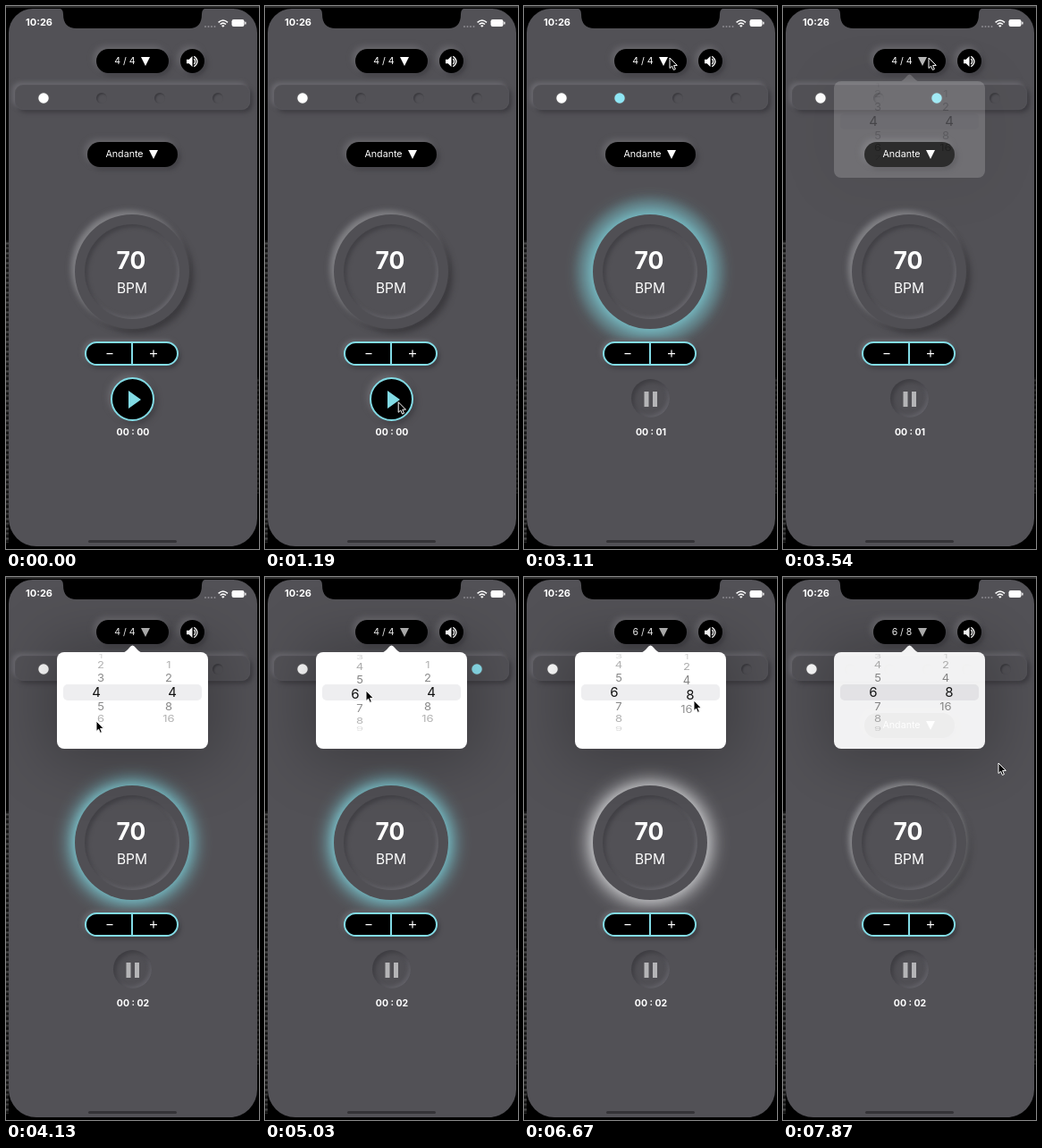
Animation, 283 px wide and 607 px high, one loop 8000 ms. Source, as an HTML page:

```html
<!DOCTYPE html>
<html lang="en">
<head>
<meta charset="utf-8">
<title>Metronome</title>
<style>
  html, body { margin: 0; width: 100%; height: 100%; overflow: hidden; background: #000; }
  #stage { position: relative; width: 283px; height: 607px; overflow: hidden; color: #fff;
    font-family: Inter, sans-serif; --gray: #525156; --cyan: #82dbe5; }
  #stage div, #stage span, #stage svg { position: absolute; box-sizing: border-box; }
  #stage span { transform: translate(-50%, -50%); white-space: pre; line-height: 1.21; }
  .frame { background: linear-gradient(#303030 2px, #000 2px); }
  .noise { background: repeating-linear-gradient(#111 0 2px, #555 3px, #222 5px, #080808 7px, #444 8px, #111 11px); }
  .screen { background: var(--gray); border-radius: 27px 27px 31px 31px; }
  .home { background: #343337; border-radius: 2px; }
  .pill { background: #000; border-radius: 14px;
    box-shadow: -3px -3px 6px #68676c, 3px 3px 5px #424146; }
  .bar { background: var(--gray); border-radius: 9px;
    box-shadow: -3px -3px 5px #69686e, 3px 3px 5px #3d3c41, inset 0 0 2px #5d5c62; }
  .dot { border-radius: 50%; }
  .dial { background: #504f54; border-radius: 50%; }
  .inner { background: var(--gray); border-radius: 50%;
    box-shadow: inset 3px 3px 4px #424146, inset -2px -2px 4px #68676d; }
  .stepper { background: #000; border: 2px solid var(--cyan); border-radius: 14px;
    box-shadow: -2px -2px 5px #68676c, 2px 3px 4px #3c3b40; }
  .divider { background: var(--cyan); }
  .play { background: #000; border: 2px solid var(--cyan); border-radius: 50%;
    box-shadow: -3px -3px 6px #68676c, 3px 3px 6px #403f44; }
  .pause { background: #504f54; border-radius: 50%;
    box-shadow: inset 3px 3px 5px #3e3d42, inset -2px -2px 4px #64636a; }
  .popover { background: #fff; border-radius: 8px; box-shadow: 0 2px 65px 12px rgba(0,0,0,.25); }
  .band { background: #eeeef0; border-radius: 5px; }
  .wheel { overflow: hidden; }
  .wheel span { color: #111; }
</style>
</head>
<body>
<div id="stage"></div>
<script>
const stage = document.getElementById('stage');
const LOOP = 8000, BEAT = 60000 / 70, START = 1750, SIX_FOUR = 6000, SIX_EIGHT = 7600;

function box(cls, x, y, w, h, parent = stage) {
  const el = document.createElement('div');
  el.className = cls;
  el.style.cssText = `left:${x}px;top:${y}px;width:${w}px;height:${h}px`;
  return parent.appendChild(el);
}

function label(text, x, y, size, weight = 400, parent = stage) {
  const el = document.createElement('span');
  el.textContent = text;
  el.style.cssText = `left:${x}px;top:${y}px;font-size:${size}px;font-weight:${weight}`;
  return parent.appendChild(el);
}

// Vector layer in stage coordinates
function art(content, parent = stage) {
  parent.insertAdjacentHTML('beforeend',
    `<svg width="283" height="607" style="left:0;top:0" fill="#fff">${content}</svg>`);
  return parent.lastElementChild;
}

const arrowDown = (x, y) => art(`<path d="M${x - 5} ${y - 5}h10l-5 10z"/>`);

// Phone and status bar
box('frame', 0, 0, 283, 607);
box('noise', 0, 262, 3, 338);
box('noise', 281, 415, 2, 130).style.opacity = .5;
box('screen', 3, 3, 278, 601);
art(`<path fill="#000" d="M57 2q7 0 7 7q0 16 15 16h126q14 0 14-16q0-7 7-7z"/>
  <g fill="#8b8a8f"><circle cx="223" cy="23" r="1"/><circle cx="226.5" cy="23" r="1"/>
  <circle cx="230" cy="23" r="1"/><circle cx="233.5" cy="23" r="1"/></g>
  <g fill="none" stroke="#fff" stroke-width="1.6"><path d="M237.6 18.3q5.2-4.6 10.4 0M239.6 20.5q3.2-2.7 6.4 0"/></g>
  <path d="M241 21.9q1.8-1.4 3.6 0l-1.8 1.9z"/>
  <rect x="252.5" y="15" width="14" height="8" rx="2.2"/><rect x="267.2" y="17.5" width="1.3" height="3" rx=".6"/>`);
label('10:26', 37, 19, 11, 700);
box('home', 92, 597, 99, 3);

// Header controls
box('pill', 101, 48, 81, 27);
const signature = label('4 / 4', 133, 62, 10.5);
const signatureArrow = arrowDown(156, 62);
box('pill', 195, 48, 27, 27);
art(`<path d="M202 59.7h2.7l3.8-3.7v12l-3.8-3.7H202z"/>
  <path fill="none" stroke="#fff" stroke-width="1.3" d="M210.3 59q2.7 3 0 6M210.3 56.3q7.4 5.7 0 11.4"/>`);

box('bar', 10, 88, 263, 28);
const dots = Array.from({ length: 6 }, () => box('dot', 0, 96.5, 12, 12));

box('pill', 91, 152, 101, 28);
label('Andante', 132.5, 166, 10.7);
arrowDown(165, 166);

// Dial
const dial = box('dial', 77, 233, 128, 128);
box('inner', 88, 244, 106, 106);
label('70', 140, 284, 26.5, 700);
label('BPM', 141, 315.5, 15.5);

// Tempo stepper, play button and timer
box('stepper', 88, 375, 105, 27);
box('divider', 140, 375, 2, 27);
art('<path d="M112.5 388h7v1.2h-7zM161 388h8v1.2h-8zM164.4 384.6h1.2v8h-1.2z"/>');
const play = box('play', 117, 415, 49, 49);
const playIcon = art('<path fill="#82dbe5" d="M137 430v20l14-10z"/>');
const pause = box('pause', 120, 417, 43, 43);
const pauseIcon = art('<path fill="#b5b5b7" d="M134.5 431h5v17h-5zM144 431h5v17h-5z"/>');
const timer = label('', 142, 477, 10.5, 700);

// Signature popover
const popover = box('', 0, 0, 283, 607);
box('popover', 57, 84, 169, 108, popover);
art('<path d="M130 85q4-1 8-6q3.500-5 7 0q4 5 8 6z"/>', popover);
box('band', 64, 120, 155, 18, popover);
const wheelArea = box('wheel', 57, 85, 169, 94, popover);
const makeWheel = (values, x, shift) => ({
  x, shift, rows: values.map(v => label(v, 0, 0, 13, 400, wheelArea))
});
const beatsWheel = makeWheel([1, 2, 3, 4, 5, 6, 7, 8, 9, 10], 106, -5);
const unitWheel = makeWheel([1, 2, 4, 8, 16], 182, 4);

const cursor = art(`<path fill="#000" stroke="#fff" stroke-width="1" stroke-linejoin="round"
  d="M0 0v11.500l2.600-2.300 1.800 4.200 2-.9-1.800-4.100h3.700z"/>`);
cursor.style.overflow = 'visible';

// Eased interpolation through [time, value, ...] points
function track(points, t) {
  const i = points.findIndex(p => p[0] > t);
  if (i === 0) return points[0].slice(1);
  if (i < 0) return points[points.length - 1].slice(1);
  const a = points[i - 1], b = points[i];
  const u = (t - a[0]) / (b[0] - a[0]), e = u * u * (3 - 2 * u);
  return a.slice(1).map((v, k) => v + (b[k + 1] - v) * e);
}

const cursorPath = [
  [600, 288, 475], [1250, 146, 442], [1700, 146, 442], [2070, 165, 59], [3110, 163, 58],
  [3600, 163, 58], [4130, 101, 161], [4280, 101, 161], [4900, 113, 127], [5300, 113, 127],
  [6000, 187, 155], [6200, 187, 155], [6670, 190, 138], [7000, 190, 138], [7550, 241, 208]
];
const beatsScroll = [[4250, 3], [5010, 4.88], [5300, 5]];
const unitScroll = [[6200, 2], [6670, 2.83], [6950, 3]];
const popoverFade = [[3500, 0], [3750, 1], [7700, 1], [7870, .93], [8100, 0]];
const pulse = [[170, 0], [500, 1], [720, .82], [BEAT, .1]];

function drawWheel({ x, shift, rows }, position) {
  rows.forEach((row, i) => {
    const d = i - position, angle = d * .355, near = Math.abs(d) < .5;
    row.style.display = Math.abs(d) < 3.6 ? '' : 'none';
    row.style.left = x - 57 + (near ? shift : 0) + 'px';
    row.style.top = 44.3 + 46 * Math.sin(angle) + 'px';
    row.style.fontSize = near ? '15px' : '13px';
    row.style.opacity = near ? 1 : Math.max(0, .66 - .165 * Math.abs(d));
    row.style.transform = `translate(-50%,-50%) scaleY(${Math.cos(angle)})`;
  });
}

function drawDots(count, beat) {
  const first = count === 4 ? 42 : 32, gap = count === 4 ? 65 : 43.4;
  dots.forEach((dot, i) => {
    const lit = i === 0 || i === beat, s = dot.style;
    s.display = i < count ? '' : 'none';
    s.left = first + gap * i - 6 + 'px';
    s.transform = lit ? 'scale(.95)' : '';
    s.background = i === 0 ? '#fff' : lit ? '#8ee6f4' : '#525156';
    s.boxShadow = lit ? '0 0 2px #777' : 'inset 1.5px 1.5px 2px #3b3a3f';
  });
}

function drawDial(glow, white) {
  const rgb = white ? '225,226,228' : '130,222,232';
  const rest = 1 - glow;
  const shadows = [
    `0 0 ${3 + 21 * glow}px ${5 * glow}px rgba(${rgb},${Math.min(1, glow * 1.3)})`,
    `-4px -4px 6px rgba(145,145,150,${.75 * rest})`,
    `5px 5px 6px rgba(55,54,58,${.8 * rest})`
  ];
  if (glow > .9) shadows.push(`0 0 8px 19px rgba(${rgb},.13)`);
  dial.style.boxShadow = shadows.join();
}

function render(time) {
  const step = 148.4;
  const t = time < 450 ? 0 : 450 + Math.floor((time - 420) / step) * step;
  const playing = t >= START;
  const six = t >= SIX_FOUR;
  const origin = t >= SIX_EIGHT ? SIX_EIGHT : six ? SIX_FOUR : START;
  const elapsed = t - origin, count = six ? 6 : 4;
  const beat = playing ? Math.floor(elapsed / BEAT) % count : 0;

  signature.textContent = t >= SIX_EIGHT ? '6 / 8' : six ? '6 / 4' : '4 / 4';
  signatureArrow.style.opacity = t >= 3500 ? .72 : 1;
  drawDots(count, beat);
  drawDial(playing ? track(pulse, elapsed % BEAT)[0] : 0, beat === 0);

  for (const el of [play, playIcon]) el.style.display = playing ? 'none' : '';
  for (const el of [pause, pauseIcon]) el.style.display = playing ? '' : 'none';
  timer.textContent = '00 : 0' + (t >= 4000 ? 2 : t >= 2990 ? 1 : 0);

  popover.style.opacity = track(popoverFade, t)[0];
  drawWheel(beatsWheel, track(beatsScroll, t)[0]);
  drawWheel(unitWheel, track(unitScroll, t)[0]);

  const [x, y] = track(cursorPath, t);
  cursor.style.transform = `translate(${x}px,${y}px)`;
}

const began = performance.now();
function tick() {
  render((performance.now() - began) % LOOP);
  requestAnimationFrame(tick);
}
tick();
</script>
</body>
</html>
```
